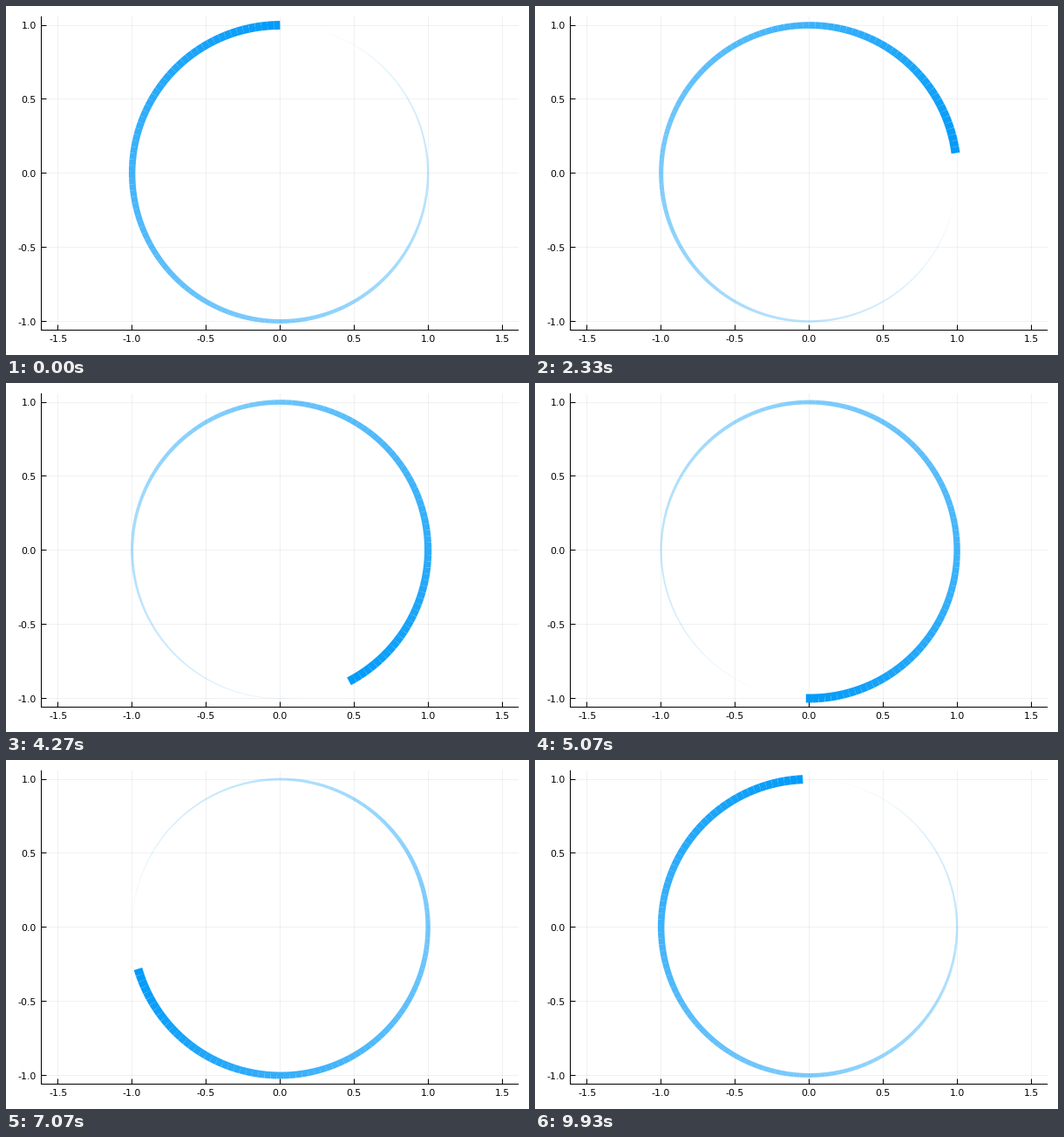
These frames come from a looping animation (600x400 px, 9.99 s). A matplotlib script:

```python
import numpy as np
import matplotlib.pyplot as plt
from matplotlib.animation import FuncAnimation
from matplotlib.collections import LineCollection

N = 150                       # points on the circle, one frame for each
LOOP_MS = 9990
W, H, DPI = 600, 400, 100
PX = 72 / DPI                 # one pixel in points

CX, CY, UNIT = 314.4, 191.75, 169.75
LEFT, RIGHT, TOP, BOTTOM = 40.5, 588.2, 11.8, 371.5
TICK = 6

plt.rcParams["font.family"] = "DejaVu Sans"

fig = plt.figure(figsize=(W / DPI, H / DPI), dpi=DPI, facecolor="white")
ax = fig.add_axes([0, 0, 1, 1])
ax.set_xlim(0, W)
ax.set_ylim(H, 0)
ax.axis("off")


def px(x):
    return CX + UNIT * x


def py(y):
    return CY - UNIT * y


def center(v):
    """Centre of the pixel that holds v."""
    return np.floor(v) + 0.5


def line(x, y, alpha=1.0, z=2):
    ax.plot(x, y, color="black", alpha=alpha, lw=PX, snap=False,
            solid_capstyle="butt", zorder=z)


def label(x, y, value, align):
    ax.text(x, y, f"{value:.1f}", fontsize=11 * PX, color="black",
            ha=align, va="baseline")


def draw_axes():
    for v in np.arange(-3, 4) / 2:
        x = center(px(v))
        line([x, x], [TOP, BOTTOM], alpha=0.055, z=1)
        line([x, x], [BOTTOM, BOTTOM - TICK])
        label(px(v), 385, v, "center")
    for v in np.arange(-2, 3) / 2:
        y = center(py(v))
        line([LEFT, RIGHT], [y, y], alpha=0.055, z=1)
        line([LEFT, LEFT + TICK], [y, y])
        label(35, py(v) + 4, v, "right")
    line([LEFT, RIGHT], [BOTTOM, BOTTOM])
    line([LEFT, LEFT], [TOP, BOTTOM + 0.5])


draw_axes()

t = np.linspace(0, 2 * np.pi, N)
circle = np.column_stack([px(np.sin(t)), py(np.cos(t))])

# Width and opacity grow from the tail to the head.
ramp = np.linspace(0, 1, N)[:-1]
colors = np.tile([0, 154 / 255, 249 / 255, 1.0], (N - 1, 1))
colors[:, 3] = ramp

trail = LineCollection([], linewidths=10 * PX * ramp, colors=colors,
                       capstyle="butt", zorder=3)
trail.set_snap(False)
ax.add_collection(trail, autolim=False)


def update(i):
    pts = np.roll(circle, -i, axis=0)
    trail.set_segments(np.stack([pts[:-1], pts[1:]], axis=1))
    return [trail]


anim = FuncAnimation(fig, update, frames=N, interval=LOOP_MS / N,
                     repeat=True, repeat_delay=0)
plt.show()
```
